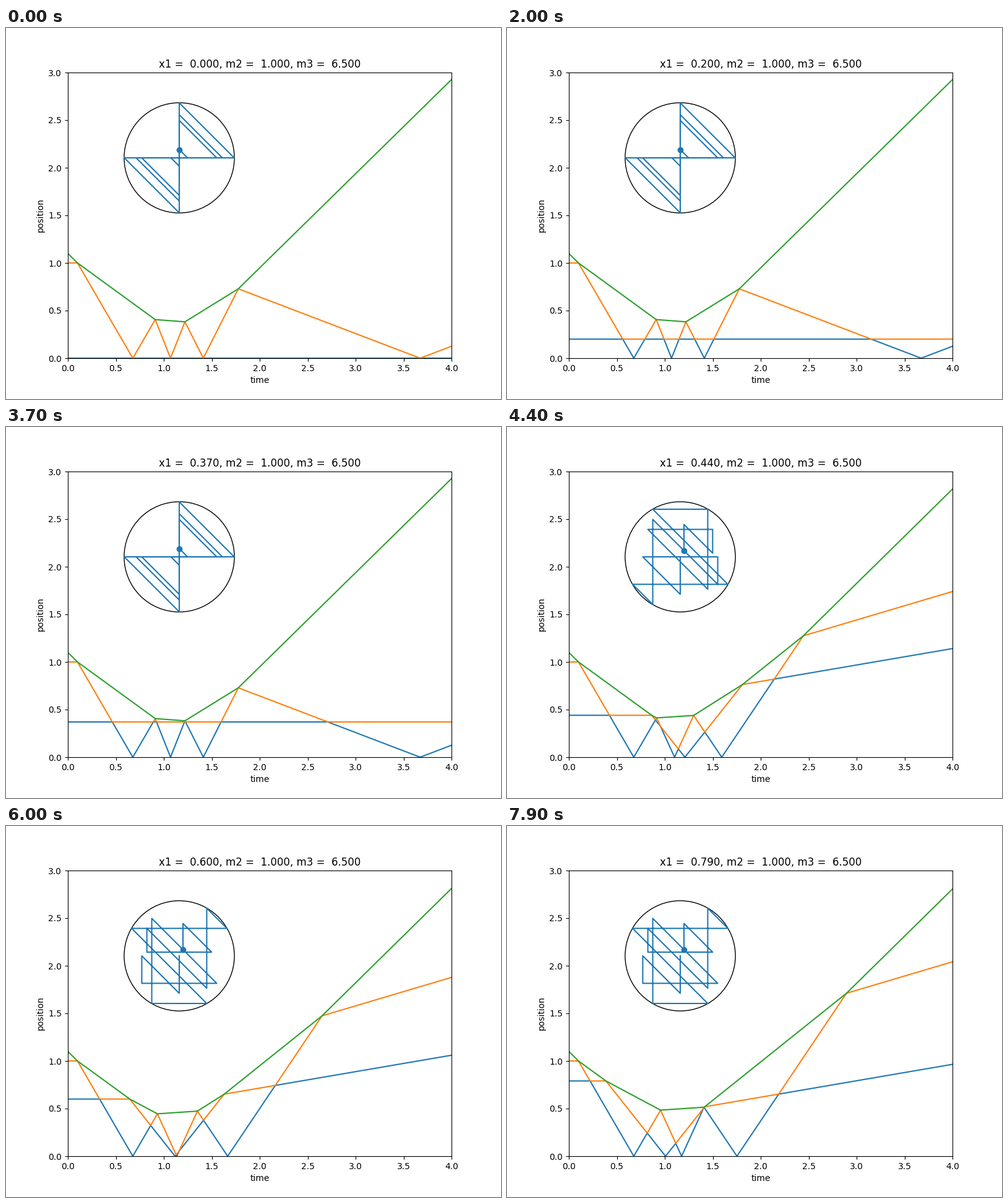
Recreate the animation shown at these times as a matplotlib script. Size 800x600 px, loop 8 s.

```python
import numpy as np
import matplotlib.pyplot as plt
from matplotlib.animation import FuncAnimation

FRAMES, INTERVAL = 80, 100
T_MAX = 4.0
MASS = np.array([1.0, 1.0, 6.5])
RADIUS = np.sqrt(MASS[2])  # sqrt of twice the kinetic energy
EPS = 1e-9


def next_event(x, v):
    """Time until the next bounce and its index (0 = wall, i = pair i-1, i)."""
    events = []
    if v[0] < -EPS:
        events.append((max(0.0, -x[0] / v[0]), 0))
    for i in (1, 2):
        closing = v[i - 1] - v[i]
        if closing > EPS:
            events.append((max(0.0, (x[i] - x[i - 1]) / closing), i))
    return min(events) if events else None


def bounce(v, i):
    v = v.copy()
    if i == 0:
        v[0] = -v[0]
    else:
        a, b = MASS[i - 1], MASS[i]
        p, q = v[i - 1], v[i]
        v[i - 1] = ((a - b) * p + 2 * b * q) / (a + b)
        v[i] = ((b - a) * q + 2 * a * p) / (a + b)
    return v


def simulate(x1):
    """Return times, positions and velocities at every bounce."""
    t = 0.0
    x = np.array([x1, 1.0, 1.1])
    v = np.array([0.0, 0.0, -1.0])
    ts, xs, vs = [t], [x], [v]
    while len(vs) < 100:
        event = next_event(x, v)
        if event is None:
            break
        dt, i = event
        t += dt
        x = x + v * dt
        v = bounce(v, i)
        ts.append(t)
        xs.append(x)
        vs.append(v)
    tail = max(T_MAX - t, 0) + 1
    ts.append(t + tail)
    xs.append(x + v * tail)
    return np.array(ts), np.array(xs), np.array(vs)


fig, ax = plt.subplots(figsize=(8, 6), dpi=100)
ax.set(xlim=(0, T_MAX), ylim=(0, 3), xlabel="time", ylabel="position")
tracks = [ax.plot([], [], color=f"C{k}")[0] for k in range(3)]
title = ax.set_title("")

inset = fig.add_axes([0.2, 0.5, 0.3, 0.3])
inset.set_aspect("equal")
inset.axis("off")
lim = RADIUS * 1.01
inset.set(xlim=(-lim, lim), ylim=(-lim, lim))
inset.add_patch(plt.Circle((0, 0), RADIUS, fill=False, color="black"))
path, = inset.plot([], [], color="C0")
dot, = inset.plot([], [], "o", color="C0")


def update(i):
    x1 = i * 0.01
    ts, xs, vs = simulate(x1)
    for k, line in enumerate(tracks):
        line.set_data(ts, xs[:, k])
    path.set_data(vs[:, 0], vs[:, 1])
    dot.set_data(vs[-1:, 0], vs[-1:, 1])
    title.set_text(f"x1 = {x1:6.3f}, m2 = {MASS[1]:6.3f}, m3 = {MASS[2]:6.3f}")
    return [*tracks, path, dot, title]


anim = FuncAnimation(fig, update, frames=FRAMES, interval=INTERVAL,
                     repeat=True, repeat_delay=0, blit=False)
plt.show()
```
